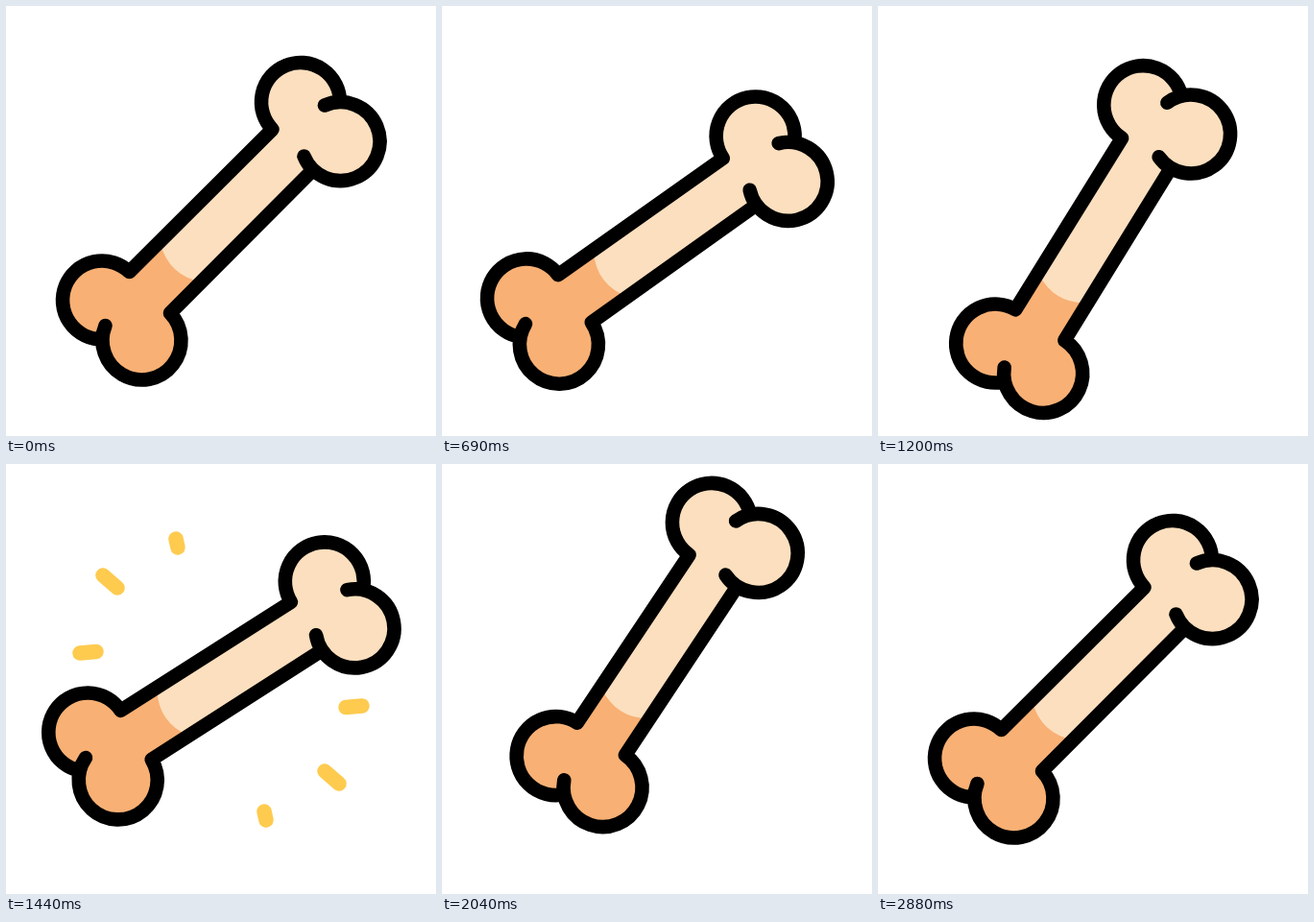
Animation of 448 by 448 pixels, one loop 3.6 s. Source, as an HTML page:

```html
<!DOCTYPE html>
<html lang="en">
<head>
<meta charset="utf-8">
<title>Bone</title>
<style>
  html, body { margin: 0; width: 100%; height: 100%; overflow: hidden; background: #fff; }
  svg { display: block; width: 100%; height: 100%; }
</style>
</head>
<body>
<svg viewBox="0 0 448 448">
  <g id="sparks" stroke="#fecb4f" stroke-width="15.5" stroke-linecap="round"></g>
  <g id="bone">
    <path id="light" d="M128.5 277L277.5 128.5A41 41 0 1 1 348 100A41 41 0 1 1 320 170.5L171 320A41 41 0 1 1 100.5 347.5A41 41 0 1 1 128.5 277Z"/>
    <path fill="#f8b074" d="M128.5 277L160.5 246.5Q169.5 281.5 204.5 287.5L171 320A41 41 0 1 1 100.5 347.5A41 41 0 1 1 128.5 277Z"/>
    <path fill="none" stroke="#000" stroke-width="14.6" stroke-linecap="round" stroke-linejoin="round"
      d="M348 100A41 41 0 1 0 277.5 128.5L128.5 277A41 41 0 1 0 100.5 347.5M310.5 156.5A41 41 0 1 0 332 103.5M103.5 333A41 41 0 1 0 171 320L320 170.5"/>
  </g>
</svg>
<script>
const LOOP = 3600, STEP = 30;
const SPARK_START = 1260, SPARK_TIME = 360;

// Keyframes: [time, value]
const TILT = [[30, 0], [560, 15], [1085, -20], [1485, 13.6], [1975, -12.3], [2460, 7], [2880, 0]];
const DROP = [[0, 0], [985, 25.3], [1945, -26], [2880, 0]];
const SHADED = [[300, 480], [2250, 2430]];

// Inner end and outward vector of each dash; the rest mirror through the centre
const DASHES = [[179, 87, -2, -9], [116, 129, -15, -13], [94, 195.5, -17, 1.5]];

const bone = document.getElementById('bone');
const light = document.getElementById('light');
const sparks = document.getElementById('sparks');

const clamp = v => Math.min(1, Math.max(0, v));
const ease = p => p * p * (3 - 2 * p);

function sample(keys, t) {
  if (t <= keys[0][0]) return keys[0][1];
  for (let i = 1; i < keys.length; i++) {
    const [t0, a] = keys[i - 1], [t1, b] = keys[i];
    if (t < t1) return a + (b - a) * ease((t - t0) / (t1 - t0));
  }
  return keys[keys.length - 1][1];
}

const lines = [...DASHES, ...DASHES.map(([x, y, dx, dy]) => [448 - x, 449 - y, -dx, -dy])].map(dash => {
  const el = document.createElementNS('http://www.w3.org/2000/svg', 'line');
  sparks.append(el);
  return { el, dash };
});

function drawSparks(p) {
  const visible = p > 0 && p < 1;
  sparks.setAttribute('visibility', visible ? 'visible' : 'hidden');
  if (!visible) return;
  const head = 3 * clamp(p / 0.75) - 1;
  const tail = 3 * clamp((p - 0.25) / 0.75) - 1;
  for (const { el, dash: [x, y, dx, dy] } of lines) {
    el.setAttribute('x1', x + dx * tail);
    el.setAttribute('y1', y + dy * tail);
    el.setAttribute('x2', x + dx * head);
    el.setAttribute('y2', y + dy * head);
  }
}

function draw(t) {
  bone.setAttribute('transform', `translate(0 ${sample(DROP, t)}) rotate(${sample(TILT, t)} 224.3 224.3)`);
  const shaded = SHADED.some(([from, to]) => t >= from && t < to);
  light.setAttribute('fill', shaded ? '#edd1b1' : '#fcdfbe');
  drawSparks((t - SPARK_START) / SPARK_TIME);
}

const start = performance.now();
function tick() {
  const t = (performance.now() - start) % LOOP;
  draw(Math.floor(t / STEP) * STEP);
  requestAnimationFrame(tick);
}
draw(0);
requestAnimationFrame(tick);
</script>
</body>
</html>
```
